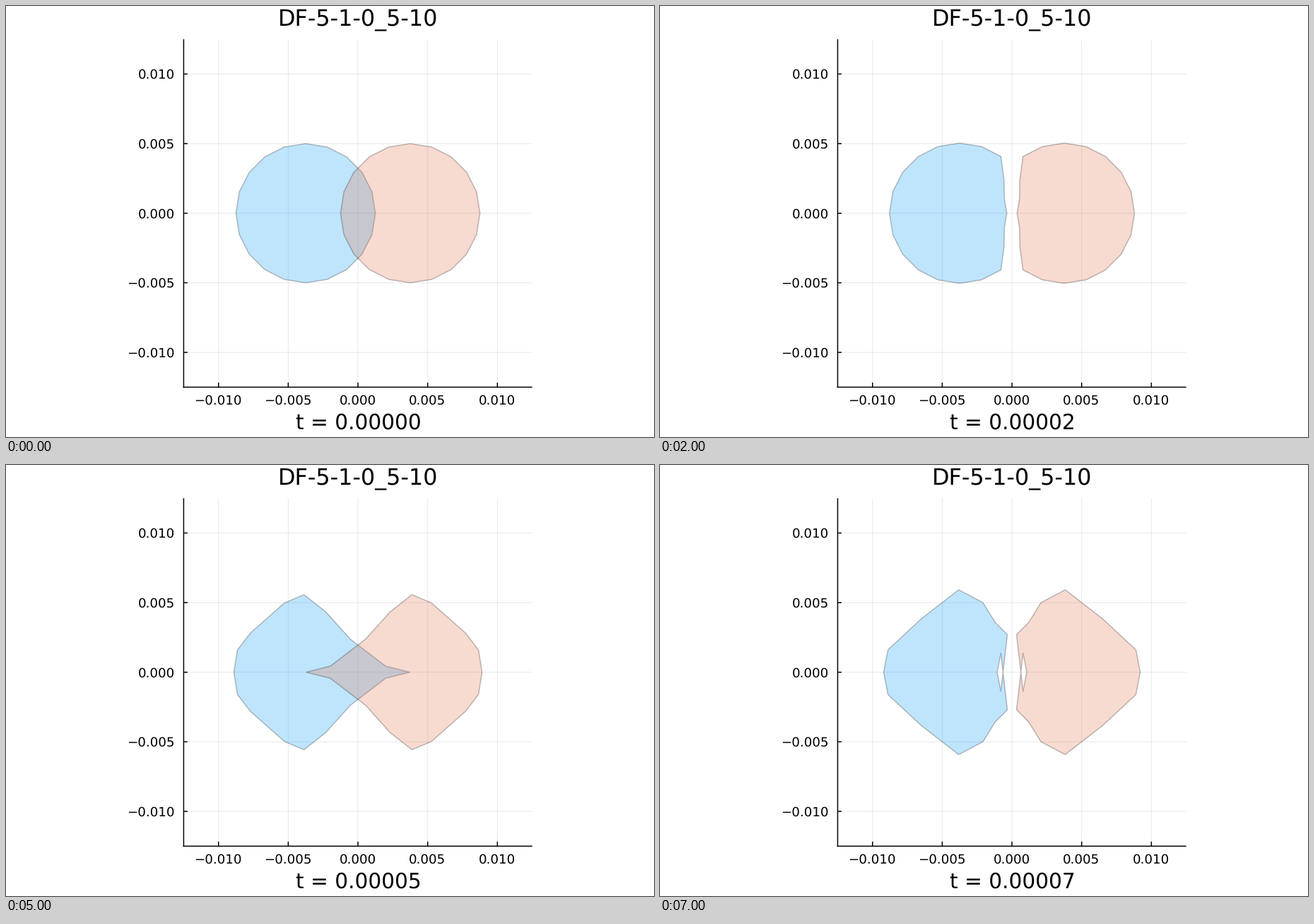
These frames come from a looping animation (917 px wide and 611 px high, 8 s). A matplotlib script:

```python
import numpy as np
import matplotlib.pyplot as plt
from matplotlib.animation import FuncAnimation
from matplotlib.patches import Polygon

W, H, DPI = 917, 611, 64
CX, CY = 498.05, 293.75    # plot origin in pixels
MM = 19.73                 # pixels per millimetre
EDGE = 12.5                # half side of the plot in mm
RADIUS, OFFSET = 5, 3.75
GROWTH = 0.0075            # relative swelling per step

plt.rcParams["font.family"] = "DejaVu Sans"
plt.rcParams["text.hinting"] = "none"

# Each step dents the swelling circle from its first key vertex inward.
# Vertex 0 is the outer end, 10 the inner one; points are in mm.
DENTS = [
    {},
    {8: (0.57, 2.42), 9: (0.54, 1.01), 10: (0.37, 0)},
    {8: (0.17, 2.38), 9: (-0.97, 1.19), 10: (-1.02, 0)},
    {4: (5.25, 4.40), 6: (2.12, 4.65), 7: (0.71, 4.43), 8: (0, 2.63),
     10: (0.21, 0)},
    {2: (7.72, 2.81), 4: (5.27, 4.98), 5: (3.87, 5.57), 6: (2.30, 4.33),
     8: (0.54, 2.37), 9: (-1.98, 0.44), 10: (-3.72, 0)},
    {0: (9.20, 0), 1: (8.89, 1.61), 3: (6.51, 3.83), 5: (3.82, 5.92),
     6: (2.08, 5.00), 7: (1.20, 3.57), 8: (0.33, 2.70), 8.5: (0.64, 0),
     9: (0.80, 1.37), 10: (1.06, 0)},
]


def outline(step, side):
    """Half a 20-gon with straight runs between its dents, then mirrored."""
    dents = DENTS[step]
    k = np.array(sorted({*range(11), *dents}))
    angle = k * np.pi / 10
    r = RADIUS * (1 + GROWTH * step)
    half = np.column_stack([OFFSET + r * np.cos(angle), r * np.sin(angle)])
    if dents:
        keys = list(dents)
        moved = k >= keys[0]
        for axis, values in enumerate(zip(*dents.values())):
            half[moved, axis] = np.interp(k[moved], keys, values)
    return np.vstack([half, half[-2:0:-1] * [1, -1]]) * [side, 1]


def pt(px):
    return px * 72 / DPI


fig = plt.figure(figsize=(W / DPI, H / DPI), dpi=DPI, facecolor="white")
ax = fig.add_axes([0, 0, 1, 1])
ax.set_xlim(-CX / MM, (W - CX) / MM)
ax.set_ylim((CY - H) / MM, CY / MM)
ax.axis("off")


def line(xs, ys, width=1.5, alpha=1, z=5):
    ax.plot(xs, ys, color="black", lw=pt(width), alpha=alpha, zorder=z,
            snap=False, solid_capstyle="butt")


def label(x, y, text, size, ha="center"):
    """Text with its baseline at a pixel position counted from the top."""
    return fig.text(x / W, 1 - y / H, text, fontsize=pt(size), ha=ha,
                    va="baseline", color="black")


for v in np.arange(-10, 11, 5):
    line([v, v], [-EDGE, EDGE], 1, 0.09, 1)
    line([-EDGE, EDGE], [v, v], 1, 0.09, 1)
    line([v, v], [-EDGE, -EDGE + 0.33])
    line([-EDGE, -EDGE + 0.28], [v, v])
    name = f"{v / 1000:.3f}".replace("-", "\u2212")
    label(CX + v * MM - 0.5, 564.5, name, 18.2)
    label(239, CY - v * MM + 6.7, name, 18.2, "right")

line([-EDGE, -EDGE], [-EDGE - 0.04, EDGE])
line([-EDGE - 0.04, EDGE], [-EDGE, -EDGE])

label(498, 28, "DF-5-1-0_5-10", 31.85)
clock = label(498.6, 599.3, "", 29.6)

blobs = []
for side, rgb in ((-1, (0, 0.604, 0.98)), (1, (0.887, 0.435, 0.278))):
    blob = Polygon(outline(0, side), closed=True, fc=(*rgb, 0.25),
                   ec=(0, 0, 0, 0.25), lw=pt(1.5), joinstyle="round",
                   zorder=3)
    ax.add_patch(blob)
    blobs.append((blob, side))


def draw(i):
    # The shape rests for one tick at the start and at the end.
    step = min(max(i - 1, 0), len(DENTS) - 1)
    for blob, side in blobs:
        blob.set_xy(outline(step, side))
    clock.set_text(f"t = {i * 1e-5:.5f}")
    return [blob for blob, _ in blobs] + [clock]


anim = FuncAnimation(fig, draw, frames=8, interval=1000, repeat=True,
                     repeat_delay=0, blit=False)
plt.show()
```
